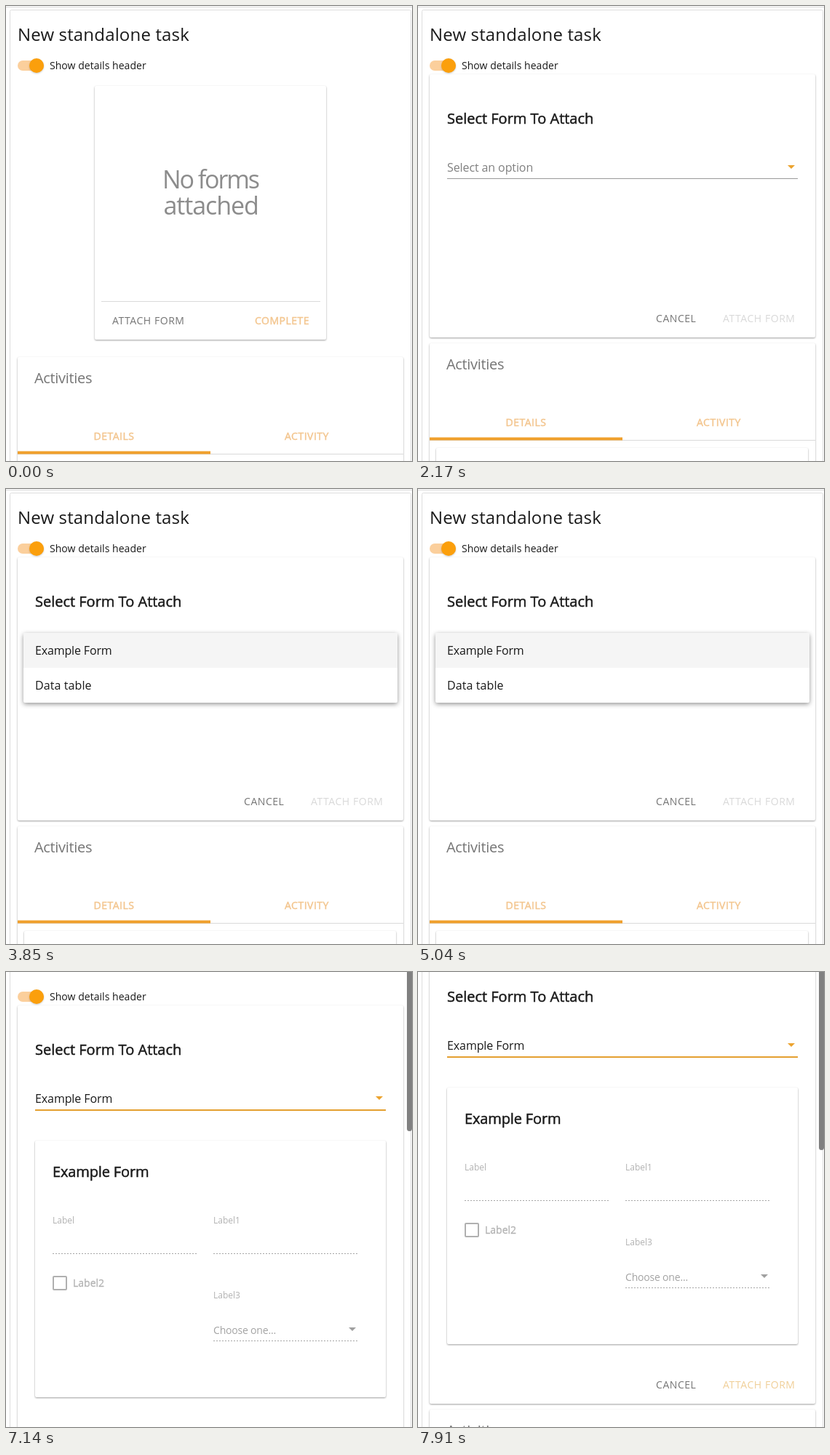
These frames come from a looping animation (558 px wide and 626 px high, 8 s). An HTML page:

```html
<!DOCTYPE html>
<html lang="en">
<head>
<meta charset="utf-8">
<title>Attach a form to a task</title>
<style>
  html, body { margin: 0; width: 100%; height: 100%; overflow: hidden; background: #fff; }
  svg { display: block; width: 558px; height: 626px; }
  text { font-family: "Open Sans", "Noto Sans", sans-serif; white-space: pre; }
  .card { fill: #fff; filter: drop-shadow(0 1px 1px rgba(0, 0, 0, .38)); }
  .panel { filter: drop-shadow(0 2px 3px rgba(0, 0, 0, .42)); }
  .knob { filter: drop-shadow(0 1px 1px rgba(0, 0, 0, .2)); }
  .dots { stroke: #a6a6a6; stroke-dasharray: 2 2; }
</style>
</head>
<body>
<svg id="stage" viewBox="0 0 558 626" xmlns="http://www.w3.org/2000/svg"></svg>
<script>
const LOOP = 8000, STEP = 70;
const ORANGE = "#eca32f", PALE = "#f3c690", DARK = "#1a1a1a", GREY = "#757575", FAINT = "#b2b2b2";

const text = (x, y, size, fill, str, extra = "") =>
  `<text x="${x}" y="${y}" font-size="${size}" fill="${fill}" ${extra}>${str}</text>`;
const medium = (x, y, size, fill, str, width = 0.5, extra = "") =>
  text(x, y, size, fill, str, `stroke="${fill}" stroke-width="${width}" ${extra}`);
const caps = (x, y, fill, str, id = "") =>
  text(x, y, 14, fill, str, `letter-spacing=".55" ${id && `id="${id}"`}`);
const boldCaps = (x, y, fill, str) => medium(x, y, 14, fill, str, 0.5, 'letter-spacing=".5"');
const rect = (x, y, w, h, fill, extra = "") =>
  `<rect x="${x}" y="${y}" width="${w}" height="${h}" fill="${fill}" ${extra}/>`;
const card = (x, y, w, h, extra = "") => rect(x, y, w, h, "#fff", `rx="2" class="card" ${extra}`);
const arrow = (x, y, fill) => `<path d="M${x} ${y}h10l-5 5z" fill="${fill}"/>`;
const dots = (x, y) => `<path class="dots" d="M${x} ${y + 0.5}h198"/>`;

const header = `
  ${rect(0, 1, 558, 1, "#dcdcdc")}
  <rect x="5.5" y="5.5" width="551" height="1600" rx="2" fill="#fff" stroke="#dedede"/>
  ${text(16, 48, 24, DARK, "New standalone task", 'letter-spacing=".16"')}
  ${rect(16, 75, 36, 14, "#fbcf9c", 'rx="7"')}
  <circle class="knob" cx="42" cy="82" r="10" fill="#fb9f0c"/>
  ${text(60, 87, 14, DARK, "Show details header", 'letter-spacing=".04"')}`;

const emptyCard = `<g id="empty">
  ${card(122, 110, 318, 349)}
  ${text(215, 251, 34, "#8c8c8c", "No forms", 'letter-spacing="-2.1"')}
  ${text(216.5, 287, 34, "#8c8c8c", "attached", 'letter-spacing="-1.05"')}
  ${rect(131, 406, 301, 1, "#dadada")}
  ${rect(130, 415, 131, 36, "#e2e2e2", 'rx="4" id="attachHover"')}
  ${caps(146, 438, GREY, "ATTACH FORM")}
  ${boldCaps(342, 438, PALE, "COMPLETE")}
</g>`;

const form = `<g id="form">
  ${card(40, 280, 482, 353)}
  ${medium(64, 330, 20, DARK, "Example Form", 0.5, 'letter-spacing="-.15"')}
  ${text(64, 394, 12, FAINT, "Label")}${dots(64, 435)}
  ${text(285, 394, 12, FAINT, "Label1")}${dots(285, 435)}
  <rect x="65" y="467" width="18" height="18" rx="1" fill="none" stroke="#b0b0b0" stroke-width="2"/>
  ${medium(92, 481, 14, FAINT, "Label2", 0.3)}
  ${text(285, 497, 12, FAINT, "Label3")}
  ${text(285, 546, 14, "#a3a3a3", "Choose one...", 'letter-spacing="-.2"')}
  ${arrow(471, 537, "#a0a0a0")}${dots(285, 555)}
</g>`;

const picker = `<g id="picker">
  ${card(16, 94, 530, 362, 'id="pickerCard"')}
  ${medium(40, 162, 20, DARK, "Select Form To Attach")}
  ${text(40, 228, 16, GREY, "Select an option", 'id="value" letter-spacing="-.1"')}
  ${arrow(508, 219, ORANGE)}
  ${rect(40, 237, 482, 1, "#9a9a9a")}
  ${rect(40, 237, 482, 2, ORANGE, 'id="underline"')}
  ${form}
  <g id="footer">
    ${rect(311, 412, 88, 36, "#e8e8e8", 'rx="4" id="cancelHover"')}
    ${caps(327, 435, GREY, "CANCEL")}
    ${caps(419, 435, "#d9d9d9", "ATTACH FORM", "attach")}
  </g>
</g>`;

const activities = `<g id="activities">
  ${card(16, 0, 530, 800)}
  ${text(39, 36, 20, GREY, "Activities", 'letter-spacing="-.3"')}
  ${boldCaps(120.5, 114, PALE, "DETAILS")}
  ${boldCaps(383, 114, PALE, "ACTIVITY")}
  ${rect(16, 133, 530, 1, "#dadada")}
  ${rect(16, 129.5, 265, 4, "#f0a02c")}
  ${card(25, 144, 511, 400)}
</g>`;

const panel = `<g id="panel">
  <g class="panel">${rect(24, 198, 514, 96, "#fff", 'rx="2"')}</g>
  ${rect(24, 198, 514, 48, "#f5f5f5")}
  <clipPath id="option">${rect(24, 198, 514, 48, "#fff")}</clipPath>
  <circle id="ripple" cx="92" cy="222" r="0" fill="#000" opacity=".08" clip-path="url(#option)"/>
  ${text(40, 228, 16, DARK, "Example Form", 'letter-spacing="-.15"')}
  ${text(40, 276, 16, DARK, "Data table", 'letter-spacing=".1"')}
</g>`;

const stage = document.getElementById("stage");
stage.innerHTML = `<g id="page">${header}${emptyCard}${activities}${picker}${panel}</g>
  ${rect(551, -60, 7, 262, "#808080", 'rx="3.5" id="thumb"')}`;

const el = {};
stage.querySelectorAll("[id]").forEach(n => el[n.id] = n);

const span = (t, from, to) => Math.min(1, Math.max(0, (t - from) / (to - from)));
const easeOut = (p, power) => 1 - (1 - p) ** power;
const mix = (a, b, p) => `rgb(${a.map((v, i) => Math.round(v + (b[i] - v) * p))})`;
const set = (node, attrs) => { for (const k in attrs) node.setAttribute(k, attrs[k]); };
const show = (node, on) => set(node, { visibility: on ? "inherit" : "hidden" });
const shift = (node, y) => set(node, { transform: `translate(0 ${y})` });

function render(time) {
  const t = Math.floor(time / STEP) * STEP;
  const picking = t >= 2030, chosen = t >= 5250, loaded = t >= 5810;
  const grow = loaded ? 259 : 0;

  show(el.empty, !picking);
  show(el.attachHover, t >= 1680 && !picking);
  show(el.picker, picking);
  show(el.cancelHover, t >= 2800 && t < 2870);
  shift(el.activities, picking ? 464 + grow : 483);
  shift(el.footer, grow);
  set(el.pickerCard, { height: 362 + grow });
  show(el.form, loaded);

  // Select field
  const focus = easeOut(span(t, 3370, 3670), 4);
  const tint = span(t, 3400, 3800);
  set(el.underline, {
    x: 281 - 241 * focus, width: 482 * focus,
    fill: mix([132, 118, 102], [228, 160, 48], tint)
  });
  set(el.value, { fill: chosen ? DARK : t >= 3430 ? mix([136, 122, 108], [236, 163, 47], tint) : "#808080" });
  el.value.textContent = chosen ? "Example Form" : "Select an option";
  set(el.attach, { fill: chosen ? "#f0cf98" : "#d9d9d9" });

  // Option list
  const open = easeOut(span(t, 3430, 3580), 2);
  const sy = 0.8 + 0.2 * open;
  set(el.panel, {
    opacity: open * (1 - span(t, 5275, 5375)),
    transform: `translate(0 ${222 * (1 - sy)}) scale(1 ${sy})`
  });
  set(el.ripple, { r: 450 * easeOut(span(t, 5200, 5400), 2) });

  // Scrolling
  const scroll = Math.round(121 * easeOut(span(t, 6930, 7770), 1.76));
  shift(el.page, -scroll);
  show(el.thumb, t >= 7000);
  shift(el.thumb, scroll * 0.356);
}

function tick(now) {
  render(now % LOOP);
  requestAnimationFrame(tick);
}
render(0);
requestAnimationFrame(tick);
</script>
</body>
</html>
```
